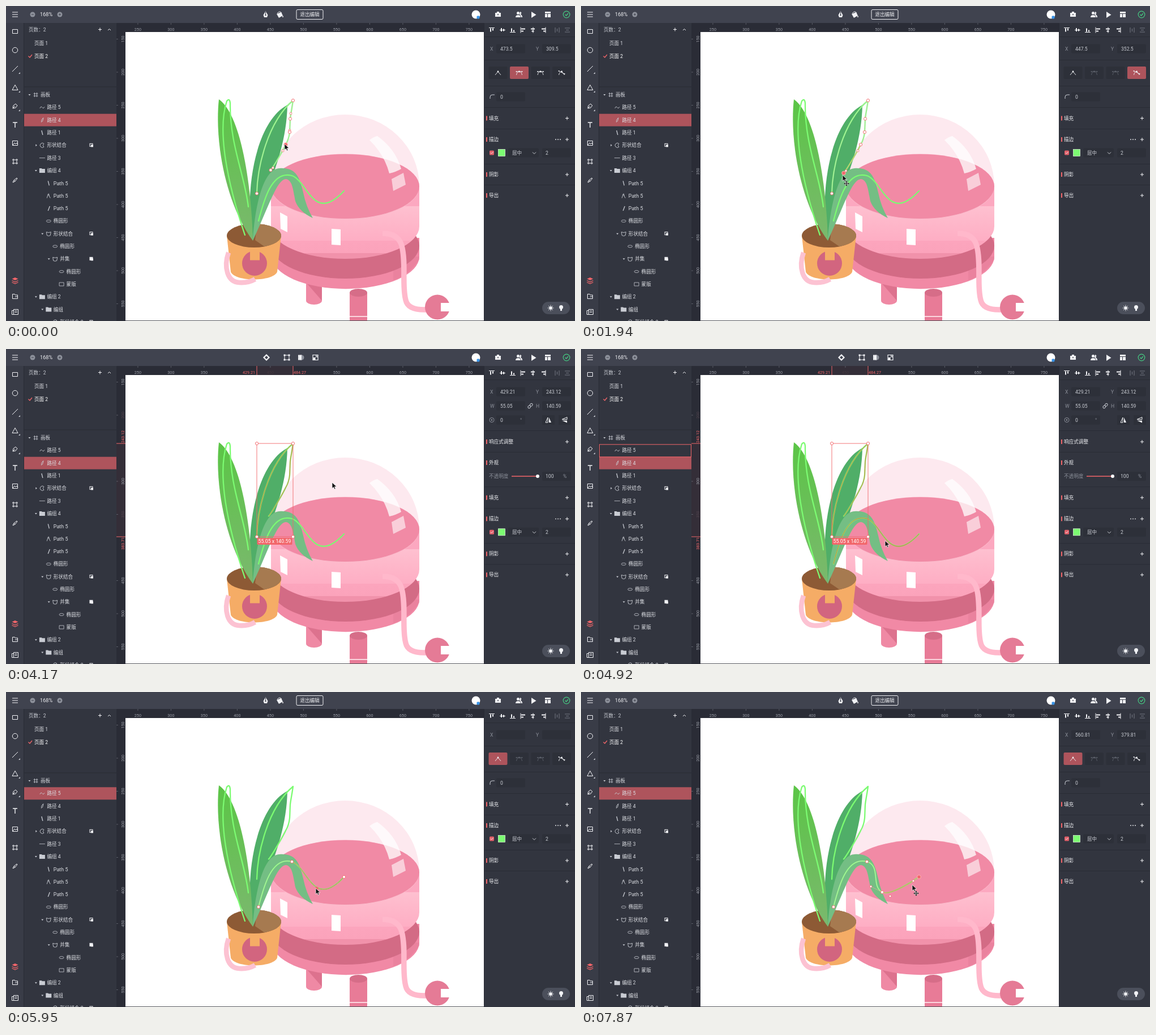
An HTML page that plays this animation: 1005x557 px, repeating every 8 s.

```html
<!DOCTYPE html>
<html lang="zh">
<head>
<meta charset="utf-8">
<title>Path editing</title>
<style>
html, body { margin: 0; width: 100%; height: 100%; overflow: hidden; background: #32353f; }
svg { display: block; width: 1005px; height: 557px; font-family: Roboto, "Noto Sans CJK SC", "Noto Sans CJK", sans-serif; }
</style>
</head>
<body>
<svg viewBox="0 0 1005 557">
  <defs>
    <linearGradient id="leafA" x2="0" y2="1"><stop stop-color="#5bc546"/><stop offset="1" stop-color="#7bb86e"/></linearGradient>
    <linearGradient id="band" gradientUnits="userSpaceOnUse" x1="0" y1="319" x2="0" y2="447">
      <stop stop-color="#fca8c0"/><stop offset=".27" stop-color="#fca8c0"/><stop offset=".27" stop-color="#fec0d0"/>
      <stop offset=".45" stop-color="#feb9cb"/><stop offset=".75" stop-color="#feaec4"/><stop offset=".75" stop-color="#fca5bd"/>
      <stop offset=".92" stop-color="#fba3bb"/><stop offset=".92" stop-color="#f192ab"/>
    </linearGradient>
    <clipPath id="soil"><ellipse cx="438" cy="406" rx="48" ry="21"/></clipPath>
  </defs>
  <g id="art"></g>
  <g id="ui"></g>
  <g id="live"></g>
</svg>
<script>
const RED = '#f2666a', ROW = '#ae545c', GREEN = '#7cfb72', WHITE = '#f1f2f5', GREY = '#c9ccd3', DIM = '#8b8f99';
const PANEL = '#32353f', FIELD = '#2d3039', LINE = '#292c35';
const $ = id => document.getElementById(id);

const T = (x, y, s, fill = GREY, size = 8.6, more = '') =>
  `<text x="${x}" y="${y + size * .36}" font-size="${size}" fill="${fill}" ${more}>${s}</text>`;
const R = (x, y, w, h, fill, more = '') => `<rect x="${x}" y="${y}" width="${w}" height="${h}" fill="${fill}" ${more}/>`;
const C = (x, y, r, fill, more = '') => `<circle cx="${x}" cy="${y}" r="${r}" fill="${fill}" ${more}/>`;
const E = (x, y, rx, ry, fill, more = '') => `<ellipse cx="${x}" cy="${y}" rx="${rx}" ry="${ry}" fill="${fill}" ${more}/>`;
const F = (d, fill = WHITE, more = '') => `<path d="${d}" fill="${fill}" ${more}/>`;
const S = (d, stroke = WHITE, w = 1, more = '') =>
  `<path d="${d}" fill="none" stroke="${stroke}" stroke-width="${w}" ${more}/>`;
const at = (x, y, s) => `<g transform="translate(${x} ${y})">${s}</g>`;
const plus = (x, y) => S(`M${x - 3} ${y}h6m-3-3v6`);
const round = 'stroke-linecap="round" stroke-linejoin="round"';

// document units to stage pixels
const px = u => 408.4 + (u - 400) * 1.17;
const py = u => 234 + (u - 300) * 1.17;

function artwork() {
  return R(211, 46, 633, 511, '#fff') +
    F('M468 318A131 126 0 0 1 730 318V330H468Z', '#fde9ef') +
    F('M530 485h28v36a14 7 0 0 1-28 0Z', '#ef89a4') + F('M530 489L558 521V485H530Z', '#dd728e') +
    F('M470 415V443A129.500 57 0 0 0 730 443V410Z', '#f189a5') +
    F('M684 485Q712 476 730 448V443H684Z', '#e77e9a', 'opacity=".6"') +
    E(599.5, 424, 130.5, 58, '#d36b85') +
    F('M468 319V390A131 57 0 0 0 730 390V319Z', 'url(#band)') +
    E(599, 319.500, 131, 58, '#fbb9ca') + E(599, 319, 131, 57, '#f18aa5') +
    F('M642 237Q650 231 656 230Q688 253 698 288Q690 293 677 296Q668 262 642 237Z', '#fff', 'opacity=".75"') +
    F('M681 306L702 295L706 316L684 327Z', '#fff', 'opacity=".58"') +
    F('M484 365L497 372V400L485 394ZM575 394L591 395V423L575 422Z', '#fff') +
    F('M607 507h31v50h-31Z', '#e87b97') + E(622.500, 507, 15.500, 7, '#d66d88') + R(607, 548, 31, 2, '#fbd5de') +
    S('M665 402Q693 402 699 424C707 455 699 495 706 520Q710 538 742 537', '#ffb8cb', 9.5) +
    C(762, 532.500, 22, '#e57b96') + R(768, 525, 17, 15, '#fff') +
    F('M390 406L397 470C404 488 472 488 479 470L486 406Z', '#f5ac66') +
    E(438, 406, 48, 21, '#8d5a35') + F('M444 380H490V410L466 432L440 414Z', '#a67a50', 'clip-path="url(#soil)"') +
    C(439, 455, 22, '#d2657f') + R(431, 432, 17, 17.5, '#f5ac66') +
    S('M393 436C384 462 391 488 412 489Q428 490 440 483', '#fcc2d2', 8.5) +
    F('M497 175C440 205 420 330 436 415C446 340 495 275 497 175Z', '#50ae68') +
    F('M376 165C368 240 388 350 436 415C434 330 418 195 376 165Z', 'url(#leafA)') +
    F('M436 415C440 350 455 288 483 287C514 285 519 305 525 330Q530 355 542 375Q518 364 511 345C507 325 506 307 494 306C478 308 466 350 436 415Z', '#74be84') +
    S('M428 355C422 300 395 245 396 172Q395 162 390 168C373 220 390 310 422 405', GREEN, 2.3, round);
}

const glyphs = {
  frame: S('M-2-4v8M2-4v8M-4-2h8M-4 2h8', GREY, .8),
  wave: S('M-4 1.500Q-2-3 0 0T4-1', GREY, .9),
  leaf: S('M-1.500 4Q-2-1 2-4Q2 0 0 3', GREY, .9),
  slash: S('M-1-4L1 4', GREY, 1.3),
  back: S('M2-4L-1 4', GREY, 1.3),
  fork: S('M-3 4L-1-3L3 4M0-4L1 0', GREY, .9),
  line: S('M-5 0h10', GREY, .8),
  bite: S('M3-3A4 4 0 1 0 3 3Q0 0 3-3', GREY, .9),
  cup: S('M-4-3Q0-1 4-3L3 3Q0 5-3 3Z', GREY, .9),
  oval: E(0, 0, 4, 2, 'none', `stroke="${GREY}" stroke-width=".8"`),
  rect: S('M-4-3h8v6h-8Z', GREY, .8),
  folder: F('M-5-4h4l1 1h5v7h-10Z', GREY)
};
// depth, arrow, glyph, label, badge
const rows = ['0 v frame 画板', '1 - wave 路径_5', '1 - leaf 路径_4', '1 - slash 路径_1', '1 > bite 形状结合 b', '1 - line 路径_3',
  '1 v folder 编组_4', '2 - slash Path_5', '2 - fork Path_5', '2 - back Path_5', '2 - oval 椭圆形', '2 v cup 形状结合 b',
  '3 - oval 椭圆形', '3 v cup 并集 f', '4 - oval 椭圆形', '4 - rect 蒙版', '1 v folder 编组_2', '2 v folder 编组', '3 > bite 形状结合_2 b'];
const rowY = i => 157 + i * 22.33;

function layer(row, i) {
  const [depth, arrow, glyph, name, badge] = row.split(' ');
  const x = 61 + depth * 11.4, y = rowY(i), label = name.replace('_', ' ');
  let s = T(x, y, label, '#dcdee3', label[0] === 'P' ? 9 : 8.6) + at(x - 8.500, y, glyphs[glyph]);
  if (arrow === 'v') s += F(`M${x - 21.500} ${y - 1}h4l-2 2.500Z`, GREY);
  if (arrow === '>') s += F(`M${x - 20} ${y - 2}v4l2.500-2Z`, GREY);
  if (badge) s += at(151, y, R(-3, -3, 5, 5, badge === 'f' ? WHITE : 'none', `stroke="${WHITE}"`) + R(-1, -1, 4, 4, WHITE));
  return s;
}

function chrome() {
  let s = R(0, 30, 32, 527, '#393c47') + R(32, 30, 163, 527, PANEL) + R(844, 30, 161, 527, PANEL) +
    R(0, 0, 1005, 30, '#40434f') + R(31, 30, 1, 527, LINE) + R(32, 142.500, 163, 1, LINE) + R(211, 556, 633, 1, '#55565c');
  s += S('M11 11h10M11 15h10M11 19h10', WHITE, 1.2) + C(47, 15, 4.500, '#8d919b') + C(95, 15, 4.500, '#8d919b') +
    S('M45 15h4M93 15h4M95 13v4', '#40434f') + T(60, 15, '168%', WHITE, 9.200);
  s += C(830, 15, 7.500, '#fff') + C(834, 20, 2.700, '#3994e8');
  s += F('M864 12h10v7h-10ZM867 10h4v2h-4Z') + R(868, 14.500, 2, 1.500, '#40434f') +
    C(904.500, 12.500, 2.500, WHITE) + F('M900 20q0-4 4.500-4t4.500 4ZM908 10q4 1 1 5q3 1 3 5h-2q0-3-3-5Z') +
    F('M928 10v11l8.500-5.500Z') + F('M952 10h10v3h-10ZM952 14h4v6h-4ZM957 14h5v6h-5Z') +
    C(990, 15, 5.800, 'none', 'stroke="#45cc83" stroke-width="1.2"') + S('M987.500 15l2 2l3.500-4', '#45cc83', 1.2);
  // tools
  s += S('M11.500 41.500h9v7h-9Z') + C(16, 78, 4.700, 'none', `stroke="${WHITE}"`) + S('M11 116L21 106') +
    S('M16 139.500L21 148.500H11Z') + at(16, 177, S('M-4 4L-3-1L1-4L4-1L1 3ZM-4 4L0 0')) + S('M12 206h8M16 206v9', WHITE, 1.4) +
    S('M11.500 238.500h9v8h-9ZM12 246l3-4l2 2l2-2l2 3') + at(16, 275, S('M-3-5v10M3-5v10M-5-3h10M-5 3h10')) +
    at(16, 308, S('M-4 4L-2 0L3-4L4-3L0 2ZM-2 0L0 2'));
  s += [119, 152, 185].map(y => F(`M25 ${y - 2}v3h-3Z`, GREY)).join('');
  s += F('M10.500 482.500L16 480L21.500 482.500L16 485Z', RED) + S('M10.500 485.500L16 488L21.500 485.500M10.500 488.500L16 491L21.500 488.500', RED, 1.3) +
    S('M11.500 517.500v-8h4l1 1.500h4v6.500ZM16 514h4') + S('M13.500 536.500h8v9h-8ZM13.500 538.500h-3v7h3M15.500 539h4M15.500 541.500h4');
  // pages
  s += T(40, 41.500, '页数：2', GREY) + plus(166, 41.500) + S('M180 43l2.500-2.500l2.500 2.500') + T(50, 66, '页面 1', '#dcdee3') +
    T(50, 88.500, '页面 2', '#fff') + S('M39.500 88.500l2.500 2.500l4-5', RED, 1.3);
  // align buttons
  s += [858, 877, 895, 913, 931, 949].map((x, i) => at(x, 42.500, i < 3
    ? S(`M-5 ${[-4, 0, 4][i]}h10`) + R(-3, [-3, -3.500, -3][i], 2, 6, WHITE) + R(1, [-3, -2, 0][i], 2, [4, 4, 3][i], WHITE)
    : S(`M${[-4, 0, 4][i - 3]}-5v10`) + R([-3, -4, -3][i - 3], -3, 7, 2, WHITE) + R([-3, -2.500, 0][i - 3], 1, 4, 2, WHITE))).join('') +
    S('M970 38v9M977 38v9M973.500 40v5M987 39h9M987 46h9M989 42.500h5', '#747883');
  s += R(844, 54, 161, 1, LINE) + R(844, 30, 1, 527, LINE);
  return s;
}

const pill = R(947, 523, 49, 22, '#4b4f5b', 'rx="11"') + C(962, 534, 2.800, WHITE) +
  S('M962 528.500v11M956.500 534h11M958 530l8 8M966 530l-8 8', WHITE, .8) +
  C(980.500, 532.500, 3.500, WHITE) + R(979, 535, 3, 4, WHITE);

function rulers(select) {
  let s = R(195, 30, 649, 16, '#2a2c36') + R(195, 30, 16, 527, '#2a2c36');
  if (select) s += R(443, 30, 64, 16, '#342e38') + R(195, 167, 16, 165, '#342e38') + S('M443 30v16M507 30v16M195 167h16M195 332h16', RED);
  const down = (y, v, fill) => T(0, 0, v, fill, 7.200, `text-anchor="middle" transform="translate(206 ${y}) rotate(-90)"`);
  for (let v = 250; v <= 750; v += 50) {
    if (select && (v === 400 || v === 500)) continue;
    s += T(px(v), 41, v, select && v === 450 ? '#44383f' : '#9a9da6', 7.200, 'text-anchor="middle"') + S(`M${px(v)} 30v3`, '#5a5d67');
  }
  for (let v = 150; v <= 550; v += 50) {
    if (select && (v === 250 || v === 400)) continue;
    s += down(py(v), v, select && (v === 200 || v === 350) ? '#50434d' : '#9a9da6') + S(`M195 ${py(v)}h3`, '#5a5d67');
  }
  if (select) s += T(440, 41, '429.21', RED, 7.200, 'text-anchor="end"') + T(508, 41, '484.27', RED, 7.200) +
    down(155, '243.12', RED) + down(344, '383.71', RED);
  return s;
}

const field = (x, y, label, value, w = 51) => T(x - 11, y, label, DIM) + R(x, y - 8, w, 16, FIELD, 'rx="2"') + T(x + 7, y, value);
const title = (y, s, dots) => R(848, y - 4, 2, 8, RED) + T(853, y, s, WHITE) + plus(991, y) +
  (dots ? [-4, 0, 4].map(d => C(975 + d, y, .9, WHITE)).join('') : '');

// fill, stroke, shadow and export blocks
const sections = dy => [179, 217, 279, 316].map(y => R(844, y + dy, 161, 1, LINE)).join('') +
  title(198.500 + dy, '填充') + title(236 + dy, '描边', 1) + title(298 + dy, '阴影') + title(335 + dy, '导出') +
  R(854, 255.500 + dy, 8, 8, '#e0606a', 'rx="1.500"') + S(`M856 ${259.500 + dy}l1.500 1.500l3-3`) +
  R(869.500, 253.500 + dy, 12, 12, GREEN, 'stroke="#e8fbe6" stroke-width=".7"') +
  R(887, 251.500 + dy, 54, 16, FIELD, 'rx="2"') + T(894, 259.500 + dy, '居中') + S(`M930 ${258.500 + dy}l3 3l3-3`, GREY) +
  R(947, 251.500 + dy, 51, 16, FIELD, 'rx="2"') + T(953, 259.500 + dy, '2');

function editPanel({ x = '', y = '', mode, dim }) {
  let s = field(866, 75.500, 'X', x) + field(947, 75.500, 'Y', y);
  for (let i = 0; i < 4; i++) {
    const c = dim && (i === 1 || i === 2) ? '#5d616b' : WHITE;
    s += R(852.500 + i * 37.500, 107, 33, 22, i === mode ? ROW : FIELD, 'rx="2"') + at(869 + i * 37.500, 118,
      S(['M-5 4L0-2L5 4', 'M-5 4Q-4-2 0-2T5 4M-5-2h10', 'M-5 4Q-4-2 0-2T5 4M-5-2h10', 'M-5 4Q-4-2 0-2L5 4M-5-3L5 2'][i], c, .9) +
      C(0, -2, 1.400, c) + (i ? C(-5, i === 3 ? -3 : -2, 1, c) + C(5, i === 3 ? 2 : -2, 1, c) : ''));
  }
  return s + S('M855 164v-3q0-4 4-4h4', GREY) + field(866, 160.500, '', '0') + R(844, 95, 161, 1, LINE) + R(844, 141, 161, 1, LINE) + sections(0);
}

function shapePanel() {
  return field(866, 75.500, 'X', '429.21') + field(947, 75.500, 'Y', '243.12') + field(866, 100.500, 'W', '55.05') + field(947, 100.500, 'H', '140.59') +
    field(866, 125.500, '', '0') + T(908, 125.500, '°', DIM) + C(858, 125.500, 4, 'none', `stroke="${DIM}"`) + C(858, 125.500, 1, GREY) +
    at(926, 100.500, `<g transform="rotate(-45)">` + R(-5, -2, 5, 4, 'none', `rx="2" stroke="${GREY}"`) + R(0, -2, 5, 4, 'none', `rx="2" stroke="${GREY}"`) + '</g>') +
    R(947, 117, 22, 17, FIELD) + R(976, 117, 22, 17, FIELD) +
    S('M957 121v9h-4Z') + F('M959 121v9h4Z') + S('M991 124.500h-9l9-4Z') + F('M982 126.500h9v4Z') +
    [144, 182].map(y => R(844, y, 161, 1, LINE)).join('') + title(164, '响应式调整') +
    R(848, 197, 2, 8, RED) + T(853, 201, '外观', WHITE) + T(853, 225, '不透明度', DIM) +
    S('M893 225h46', RED, 1.5) + C(939, 225, 3, '#fff') + R(947, 217, 51, 16, FIELD, 'rx="2"') + T(953, 225, '100') + T(984, 225, '%', DIM) +
    sections(64.3);
}

const topBar = edit => edit
  ? at(458.500, 15, F('M0-6L4 1L2.500 5h-5L-4 1Z') + S('M0-5v6', '#40434f') + C(0, 1, 1.200, '#40434f')) +
    at(484, 15, F('M-6-1L2-4L5 2L-2 6ZM5 2q2 3 0 3t0-3') + S('M-5-2Q0-8 3-2')) +
    R(513, 6.500, 47, 17, 'none', `rx="2" stroke="${WHITE}"`) + T(536.500, 15, '退出编辑', WHITE, 8.6, 'text-anchor="middle"')
  : at(460, 15, S('M0-4.500L4.500 0L0 4.500L-4.500 0Z', WHITE, 2.2)) +
    at(496, 15, S('M-4-4h8v8h-8Z') + [[-4, -4], [4, -4], [-4, 4], [4, 4]].map(([x, y]) => R(x - 1.500, y - 1.500, 3, 3, WHITE)).join('')) +
    at(521, 15, R(-5, -4.500, 6, 9, WHITE) + C(1, 0, 4.500, '#8d919b') + F('M1-4.500A4.500 4.500 0 0 0 1 4.500Z')) +
    at(546.500, 15, S('M-4.500-4.500h9v9h-9Z', WHITE, 1.2) + R(-4, 0, 4, 4, WHITE) + S('M0 0L3-3M0-3h3v3'));

const spans = [[330, 330, 1], [620, 1650, 8], [1800, 2680, 7], [4170, 4170, 1], [4470, 5360, 7], [5660, 6700, 8], [6850, 7870, 8]];

// the picture advances in steps inside each span and rests between them
function step(t) {
  let q = 0;
  for (const [a, b, n] of spans) {
    if (t < a) break;
    const d = n > 1 ? (b - a) / (n - 1) : 1;
    q = a + Math.min(n - 1, Math.floor((t - a + 10) / d)) * d;
  }
  return q;
}

const ramp = (t, a, b) => Math.max(0, Math.min(1, (t - a) / (b - a)));
const mix = (a, b, k) => a.map((v, i) => v + (b[i] - v) * k);
const trail = [[0, 492, 244], [330, 492, 245], [500, 492, 245], [1070, 468, 291], [1350, 468, 292], [1940, 462, 299], [2090, 462, 299],
  [2670, 576, 236], [4320, 576, 236], [4915, 537, 339], [5360, 537, 339], [5950, 547, 347], [6100, 548, 348], [6990, 539, 352],
  [7140, 539, 352], [7720, 585, 340], [7870, 585, 341]];

function cursorAt(t) {
  let i = 0;
  while (i < trail.length - 2 && t > trail[i + 1][0]) i++;
  const [a, b] = [trail[i], trail[i + 1]];
  return mix(a, b, ramp(t, a[0], b[0])).slice(1);
}

const node = ([x, y], on) => C(x.toFixed(1), y.toFixed(1), on ? 3.300 : 2.600, on ? RED : '#fff', `stroke="${on ? '#ffb9b9' : RED}" stroke-width=".9"`);
const handle = ([x, y]) => R(x - 1.800, y - 1.800, 3.600, 3.600, '#fff', `rx="1" stroke="${RED}" stroke-width=".8"`);
const arm = (a, b) => S(`M${a}L${b}`, '#f3a3a3', .6);
const near = v => Math.round(v * 2) / 2;

function render(q) {
  const leafEdit = q < 4170, archEdit = q >= 5200, shape = !leafEdit && !archEdit;
  const hover = q >= 4760 && shape;
  const row = archEdit ? 1 : 2;
  let s = '';

  // right leaf outline
  const endUnit = mix([450.5, 348], [447.5, 352.5], ramp(q, 1490, 1930));
  const end = [px(endUnit[0]), py(endUnit[1])], inner = [end[0] + 4, end[1] - 4];
  const bend = [494, 245], tail = `C489 256 ${inner} ${end}`;
  const leaf = `M443 331C444 285 462 205 507 167C505 182 503 190 502 199C501.5 208 501.5 215 501 223C500 233 497 240 ${bend}${tail}`;
  s += S(leaf, GREEN, 2.3, round);

  // drooping leaf line, split where the node is added
  const k = ramp(q, 6240, 6980), split = q >= 6090;
  const h1 = mix([521.8, 305.4], [530, 307], k), h2 = mix([531.8, 335.3], [512, 344], k), mid = mix([549, 345.6], [531.9, 353.9], k);
  const h3 = mix([560.4, 352.4], [546, 361], k), h4 = mix([575.2, 350.6], [587, 334], k), tip = [597, 327], crest = [505, 300];
  const segA = `C${h1} ${h2} ${mid}`, segB = `C${h3} ${h4} ${tip}`;
  const arch = `M446 380C455 345 469 290 ${crest}${segA}${segB}`;
  s += S(arch, GREEN, 2.3, round);

  if (leafEdit) {
    const endOn = q >= 1350;
    s += S(leaf, '#d8d8c8', .8) + (endOn ? S(`M${bend}${tail}`, '#f0a050', .9) : '');
    s += (endOn ? [[489, 256], inner] : [[503, 190], [501, 220], [489, 256], inner]).map(handle).join('');
    s += [[443, 331.5], [507, 167], [502, 199.5], [501, 223]].map(p => node(p)).join('') + node(bend, !endOn) + node(end, endOn);
  }
  if (shape) {
    s += S(leaf, '#e0763c', 1);
    if (hover) s += S(arch, '#e0663c', 1);
    s += R(443, 167, 64, 165, 'none', `stroke="${RED}" stroke-width=".9"`) +
      [[443, 167], [507, 167], [443, 332], [507, 332]].map(p => node(p)).join('') +
      R(443.500, 334, 62, 12, RED, 'rx="1.500"') + T(474.500, 340, '55.05 x 140.59', '#fff', 8.8, 'text-anchor="middle"');
  }
  if (archEdit) {
    const tipOn = q >= 7700;
    s += S(arch, '#d8d8c8', .8);
    if (!split && q >= 5790) s += S(`M${crest}${segA}${segB}`, '#d0703c', .9) + C(549, 347, 2.500, RED);
    if (split) {
      s += tipOn ? S(`M${mid}${segB}`, '#e0843c', .9) : S(`M${crest}${segA}`, '#e0843c', .9);
      const arms = [[mid, h2], [mid, h3], [tip, h4]].concat(tipOn ? [] : [[crest, [469, 290]], [crest, h1]]);
      s += arms.map(([a, b]) => arm(a, b) + handle(b)).join('') + node(mid, !tipOn);
    }
    s += node([446, 380]) + node(crest) + node(tip, tipOn);
  }

  s += rulers(shape) + topBar(!shape);
  s += R(32, rowY(row) - 11, 163, 22, ROW) + rows.map(layer).join('');
  if (hover) s += R(32.500, rowY(1) - 10.500, 162, 22, 'none', `stroke="${RED}"`);

  if (shape) s += shapePanel();
  else if (leafEdit) s += editPanel(q < 1350 ? { x: 473.5, y: 309.5, mode: 1 } : { x: near(endUnit[0]), y: near(endUnit[1]), mode: 3, dim: true });
  else if (q >= 7700) s += editPanel({ x: '560.81', y: '379.81', mode: 0, dim: true });
  else if (split) s += editPanel({ x: near((mid[0] - 408.4) / 1.17 + 400), y: near((mid[1] - 234) / 1.17 + 300), mode: 0 });
  else s += editPanel({ mode: 0, dim: true });

  const [cx, cy] = cursorAt(q);
  const moving = q > 1000 && q < 2200 || q >= 6090 && q < 7200 || q >= 7700;
  s += pill + at(cx, cy, F('M0 0V10.500L2.500 8.300L4.300 12L6 11.200L4.400 7.600H8Z', '#111', 'stroke="#fff" stroke-width=".7"') +
    (moving ? at(7, 15, S('M-4 0H4M0-4V4', '#fff', 3) + S('M-3 0H3M0-3V3', '#111', 1.2) +
      F('M-4.500 0l2-2v4ZM4.500 0l-2-2v4ZM0-4.500l-2 2h4ZM0 4.500l-2-2h4Z', '#111')) : ''));
  $('live').innerHTML = s;
}

$('art').innerHTML = artwork();
$('ui').innerHTML = chrome();
let start, shown = -1;
function tick(now) {
  start ??= now;
  const q = step((now - start) % 8000);
  if (q !== shown) render(shown = q);
  requestAnimationFrame(tick);
}
render(0);
requestAnimationFrame(tick);
</script>
</body>
</html>
```
